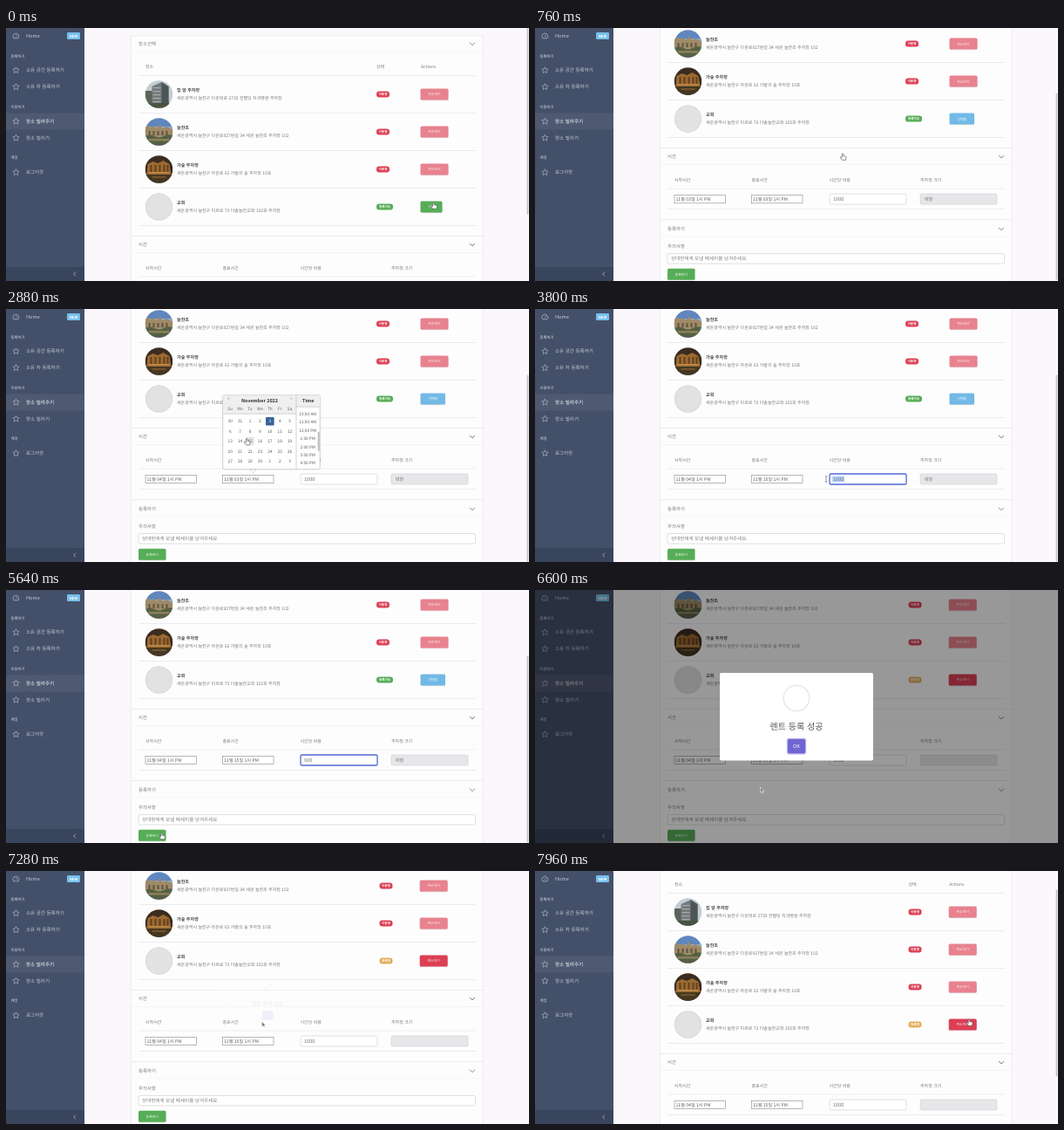
These frames come from a looping animation (600x290 px, 8 s). An HTML page:

```html
<!DOCTYPE html>
<html lang="ko">
<head>
<meta charset="utf-8">
<title>주차장 빌려주기</title>
<style>
html, body { margin: 0; width: 100%; height: 100%; overflow: hidden; background: #faf8fa; }
svg { display: block; width: 600px; height: 290px; }
text { font-family: "Noto Sans CJK KR", "Noto Sans CJK", "Noto Sans", sans-serif; text-rendering: geometricPrecision; white-space: pre; }
</style>
</head>
<body>
<svg id="stage" viewBox="0 0 600 290" xmlns="http://www.w3.org/2000/svg"></svg>
<script>
const LOOP = 8000, MAX_SCROLL = 102;
const SELECT_AT = 140, SAVED_AT = 6260, CLOSE_AT = 7160, CLOSED_AT = 7310;
const START_OPEN = 1280, START_PICK = 1860, END_OPEN = 2400, END_PICK = 3040;
const FOCUS_AT = 3400, BLUR_AT = 5720;
const INK = '#77757d', RED = '#dc3f54', PINK = '#e8828e', GREEN = '#56ad57', BLUE = '#72b9e6';

// --- markup helpers; y is the vertical middle of a text line
const text = (x, y, str, size, fill = INK, extra = '') =>
  `<text x="${x}" y="${y + size * 0.36}" font-size="${size}" fill="${fill}" ${extra}>${str}</text>`;
const mid = (x, y, str, size, fill, extra = '') =>
  text(x, y, str, size, fill, `text-anchor="middle" ${extra}`);
const bold = 'font-weight="700"', medium = 'font-weight="500"';
const rect = (x, y, w, h, fill, extra = '') =>
  `<rect x="${x}" y="${y}" width="${w}" height="${h}" fill="${fill}" ${extra}/>`;
const rule = (x1, x2, y, color = '#e2e0e5') => rect(x1, y - 0.3, x2 - x1, 0.6, color);
const stroke = (d, color, width, extra = '') =>
  `<path d="${d}" fill="none" stroke="${color}" stroke-width="${width}" ${extra}/>`;
const group = (id, body, extra = '') => `<g id="${id}" ${extra}>${body}</g>`;

const badge = (x, y, w, label, fill) =>
  rect(x, y - 3.5, w, 7, fill, 'rx="3.2"') + mid(x + w / 2, y, label, 3.6, '#fff', bold);
const button = (x, y, w, label, fill) =>
  rect(x, y - 5.8, w, 13, '#000', 'rx="1.5" opacity=".12"') +
  rect(x, y - 6.5, w, 13, fill, 'rx="1.5"') + mid(x + w / 2, y, label, 3.9, '#fff', medium);
const chevron = y => stroke(`M532 ${y - 1.3}l3 3 3-3`, '#77747c', 0.9);

// --- sidebar
function sidebar() {
  const star = y => {
    const points = Array.from({ length: 10 }, (_, i) => {
      const r = i % 2 ? 1.8 : 3.8, a = i * Math.PI / 5 - Math.PI / 2;
      return `${(11.5 + r * Math.cos(a)).toFixed(2)},${(y + r * Math.sin(a)).toFixed(2)}`;
    });
    return `<polygon points="${points.join(' ')}" fill="none" stroke="#aeb5c3" stroke-width=".7"/>`;
  };
  const item = (y, label, fill = '#c8ccd6') => star(y) + text(23, y, label, 5.55, fill);
  const title = (y, label) => text(5.5, y, label, 4.4, '#dde0e6', medium);
  return rect(0, 0, 90, 290, '#445069') +
    rect(0, 97.5, 90, 19, '#4f5a72') +
    stroke('M8.8 11.8a3.4 3.4 0 1 1 5.2 0zM11.4 10.2l1-2.2', '#aeb5c3', 0.8) +
    text(23, 9, 'Home', 5.6, '#c8ccd6') +
    rect(70, 5, 15, 8, '#76bfeb', 'rx="1.2"') + mid(77.5, 9, 'NEW', 4.2, '#fff', bold) +
    title(32, '등록하기') + item(48.5, '소유 공간 등록하기') + item(67.5, '소유 차 등록하기') +
    title(90, '이용하기') + item(107, '장소 빌려주기', '#fff') + item(126, '장소 빌리기') +
    title(148, '계정') + item(165.5, '로그아웃') +
    rect(0, 274, 90, 16, '#39455d') + stroke('M80 279.6l-2.4 2.4 2.4 2.4', '#b5bac6', 0.8);
}

// --- place pictures, drawn around the origin and clipped to a circle
const pictures = [
  rect(-16, -16, 32, 32, '#c3cdd2') + rect(-16, -4, 12, 20, '#59655a') +
    '<path d="M-8 16V-9L3-14 11-9V16z" fill="#737a7c"/><path d="M3-14L11-9V16H3z" fill="#4c5558"/>' +
    [-8, -4, 0, 4, 8].map(y => rect(-7, y, 9, 1.2, '#a5acac')).join('') + rect(-16, 10, 32, 6, '#49543f'),
  rect(-16, -16, 32, 32, '#5f86be') + rect(-16, -6, 32, 5, '#90a9c6') +
    '<path d="M-16 8V-5l3-3 3 3 4-2 4 3 3-5 3 5 5-2 7 4V8z" fill="#a08a66"/>' +
    [-12, -7, -2, 3, 8].map(x => rect(x, -1, 2, 5, '#5e5443')).join('') +
    '<path d="M-16 5q6-3 11 0t10 0 11-1V16H-16z" fill="#556044"/>' + rect(-12, 8, 24, 2.5, '#8d8058'),
  rect(-16, -16, 32, 32, '#3b2c20') + '<path d="M-14 6l1-12 6-3 6 2 6-3 7 4 2 12z" fill="#9c6a32"/>' +
    [-10, -5, 0, 5, 9].map(x => rect(x, -5, 2, 9, '#64401f')).join('') + rect(-12, 3, 24, 1.5, '#c08f4b') +
    rect(-16, 6, 32, 10, '#443722') + rect(-8, 8, 16, 2, '#745228'),
  '<circle r="16" fill="#d6d6d6"/><circle r="15" fill="#e2e2e2"/>'
];
const places = [
  ['집 앞 주차장', '새온광역시 늘찬구 다온대로 2735 한별딩 치과병원 주차장'],
  ['늘찬초', '새온광역시 늘찬구 다온로927번길 34 새온 늘찬초 주차장 102'],
  ['가숲 주차장', '새온광역시 늘찬구 라온로 62 가람의 숲 주차장 10호'],
  ['교회', '새온광역시 늘찬구 미르로 73 다솔늘찬교회 102호 주차장']
];

function page() {
  const rowY = i => 76 + i * 43;
  const rows = places.map(([name, address], i) => {
    const y = rowY(i);
    return `<g transform="translate(175.5 ${y})" clip-path="url(#round)">${pictures[i]}</g>` +
      text(196, y - 5, name, 5.1, '#47454d', bold) + text(196, y + 4, address, 5) + rule(152, 539, y + 21.3);
  }).join('');
  const busy = [0, 1, 2].map(rowY);
  const lastY = rowY(3);
  const statuses = text(425, 44.5, '상태', 5) + busy.map(y => badge(425, y, 15, '이용중', RED)).join('') +
    group('free', badge(425, lastY, 19, '등록가능', GREEN)) +
    group('listed', badge(425, lastY, 15, '등록중', '#e3ae5a'));
  const actions = text(476, 44.5, 'Actions', 5) + busy.map(y => button(475.5, y, 32, '취소하기', PINK)).join('') +
    group('choose', button(475.5, lastY, 25, '선택', GREEN)) +
    group('chosen', button(475.5, lastY, 28.5, '선택됨', BLUE)) +
    group('cancel', button(475.5, lastY, 32, '취소하기', RED));
  const dateBox = (x, id) => rect(x, 292.3, 58.5, 9.4, '#fff', 'stroke="#88868c" stroke-width=".6"') +
    group(id, text(x + 1.5, 297, '', 5.1, '#5a585f'));
  const heads = ['시작시간', '종료시간', '시간당 비용', '주차장 크기'];
  return rect(143.5, 9, 403.5, 400, '#fefdfe', 'stroke="#e4e2e7" stroke-width=".6"') +
    text(152, 18, '장소선택', 5.4) + chevron(18) + rule(144, 547, 27, '#f0eef2') +
    text(160, 44.5, '장소', 5) + rule(152, 539, 54.4) + rows +
    group('statuses', statuses) + group('actions', actions) +
    rule(144, 547, 238.3) + text(152, 248, '시간', 5.4) + chevron(248.3) + rule(144, 547, 257.5, '#f0eef2') +
    heads.map((h, i) => text([160, 248.5, 337.5, 442][i], 274.7, h, 5)).join('') + rule(152, 539, 285) +
    dateBox(160, 'startDate') + dateBox(248.5, 'endDate') +
    rect(338, 291, 88, 12, '#fff', 'id="cost" rx="1.6"') +
    rect(341, 293.5, 14, 7, '#b4d5fe', 'id="selection"') +
    group('costText', text(342, 297, '', 5.6, '#77757d')) +
    rect(442, 291, 88, 12, '#e8e6e9', 'rx="1.6" stroke="#cfcdd3" stroke-width=".6"') +
    group('size', text(446.5, 297, '대형', 5.3)) + rule(152, 539, 308.5) +
    rule(144, 547, 320.3) + text(152, 330.7, '등록하기', 5.4) + chevron(331) + rule(144, 547, 340, '#f0eef2') +
    text(152, 351.3, '주의사항', 5.4) +
    rect(152, 359.5, 386.5, 11.5, '#fff', 'rx="1.6" stroke="#cbc9cf" stroke-width=".6"') +
    text(156, 365.3, '상대방에게 보낼 메세지를 남겨주세요.', 5.55, '#807e85') +
    button(152, 383.2, 31.5, '등록하기', GREEN);
}

// --- calendar popup, drawn from its own top left corner
const CELL = 11.4;
const dayX = col => 8.5 + col * CELL, dayY = row => 30 + row * CELL;
function calendar() {
  const names = ['Su', 'Mo', 'Tu', 'We', 'Th', 'Fr', 'Sa'];
  const hours = ['10:00 AM', '11:00 AM', '12:00 PM', '1:00 PM', '2:00 PM', '3:00 PM', '4:00 PM'];
  const dayMark = (extra, fill) => rect(-4.8, -4.8, 9.6, 9.6, fill, `rx="1.3" ${extra}`);
  const marked = `transform="translate(${dayX(4)} ${dayY(0)})"`;
  const days = Array.from({ length: 35 }, (_, i) => {
    const date = i < 2 ? 30 + i : (i - 2) % 30 + 1;
    return mid(dayX(i % 7), dayY(Math.floor(i / 7)), date, 4.7, i === 4 ? '#fff' : '#55535a');
  }).join('');
  return rect(0, 0, 111.5, 85, '#fff', 'rx="1.5" stroke="#aaa8ad" stroke-width=".6"') +
    rect(0.3, 0.3, 84, 21, '#f0eff0') + rect(84.6, 0.3, 26.6, 13, '#f0eff0') +
    rule(0, 84, 21.3, '#b5b3b8') + rule(84, 111, 13.3, '#b5b3b8') + rect(84, 0, 0.6, 85, '#b5b3b8') +
    stroke('M7.3 2l-1.6 1.6 1.6 1.6M77.6 2l1.6 1.6-1.6 1.6', '#aaa', 0.8) +
    mid(42.3, 6.6, 'November 2022', 5.4, '#2f2d33', bold) + mid(98, 6.6, 'Time', 5.4, '#2f2d33', bold) +
    names.map((n, i) => mid(dayX(i), 16, n, 4.7, '#5f5d64')).join('') +
    dayMark('id="hovered"', '#e6e5e8') + dayMark(marked, '#39639a') + days +
    hours.map((h, i) => mid(97.5, 21.5 + i * 9.4, h, 4.7, '#55535a')).join('') +
    rect(109, 42, 2, 22, '#bdbbc0', 'rx="1"') +
    '<path d="M31 85l3.6 4 3.6-4z" fill="#fff" stroke="#aaa8ad" stroke-width=".5"/>';
}

const dialog = () =>
  rect(212, 95, 176, 100.5, '#fff', 'rx="1.8"') +
  '<circle cx="300" cy="124" r="14.8" fill="none" stroke="#e5e8e3" stroke-width="1.5"/>' +
  stroke('M292 125l5.5 5.5 11-12', '#a9d593', 1.8, 'id="check" pathLength="1" stroke-dasharray="1 2" stroke-linecap="round"') +
  mid(300, 156, '렌트 등록 성공', 10, '#545454') +
  rect(288.8, 169.8, 22.4, 18.6, '#b9b3ee', 'rx="2.6"') + rect(290, 171, 20, 16.2, '#7066d2', 'rx="1.8"') +
  mid(300, 179, 'OK', 5.6, '#fff', medium);

const cursors =
  group('hand', '<path transform="scale(.85)" d="M-.9.4Q0-.5.9.4V3l3 .7q1 .4.8 1.5L4 8.6H-.9L-3.3 5.3q-.1-1.2 1-.9l1.4.9z" fill="#fff" stroke="#444" stroke-width=".7" stroke-linejoin="round"/>') +
  group('arrow', '<path d="M0 0V6L1.5 4.8 2.5 7 3.4 6.6 2.4 4.5H4.3z" fill="#777" stroke="#fff" stroke-width=".5"/>') +
  group('beam', stroke('M-1.2-3.2H1.2M0-3.2V3.2M-1.2 3.2H1.2', '#555', 0.6));

document.getElementById('stage').innerHTML =
  '<defs><clipPath id="round"><circle r="15.8"/></clipPath></defs>' +
  rect(0, 0, 600, 290, '#faf8fa') + group('page', page()) + group('calendar', calendar()) + sidebar() +
  rect(597.6, 0, 1.8, 214, '#c3c1c7', 'id="thumb" rx=".9"') +
  rect(0, 0, 600, 290, '#000', 'id="shade"') + group('dialog', dialog()) + group('cursor', cursors);

// --- motion
const $ = id => document.getElementById(id);
const show = (id, on) => $(id).setAttribute('visibility', on ? 'inherit' : 'hidden');
const move = (id, x, y) => $(id).setAttribute('transform', `translate(${x} ${y})`);
const write = (id, str) => { $(id).firstChild.textContent = str; };
const progress = (t, from, to) => Math.min(1, Math.max(0, (t - from) / (to - from)));
const smooth = p => p * p * (3 - 2 * p);
const easeOut = p => 1 - (1 - p) ** 2.5;

// time, x, y, pointer shape from that time on
const track = [
  [0, 490.5, 200, 'hand'], [260, 490.5, 200, 'arrow'], [700, 353, 144, 'hand'], [900, 353, 144, 'arrow'],
  [1220, 190, 194, 'beam'], [1420, 190, 194, 'hand'], [1740, 225, 127, 'hand'], [1920, 225, 127, 'arrow'],
  [2260, 285, 194, 'beam'], [2480, 285, 194, 'hand'], [2840, 276, 148.5, 'hand'], [3080, 277, 149, 'arrow'],
  [3340, 358, 195, 'beam'], [3440, 358, 195, 'beam'], [3800, 334, 195, 'beam'], [4600, 334, 195, ''],
  [5200, 334, 195, 'arrow'], [5560, 178.5, 278.5, 'hand'], [5860, 178.5, 278.5, 'arrow'],
  [6500, 258.5, 226, 'arrow'], [6660, 258.5, 226, 'arrow'], [7000, 299, 177, 'hand'], [7140, 299, 177, 'arrow'],
  [7270, 293.5, 172.5, 'arrow'], [7420, 293.5, 172.5, 'arrow'], [7860, 498, 170, 'hand'], [LOOP, 498, 170, 'hand']
];
function pointer(t) {
  const i = track.findIndex(key => key[0] > t);
  const [t0, x0, y0, shape] = track[i - 1], [t1, x1, y1] = track[i];
  const p = smooth(progress(t, t0, t1));
  return { x: x0 + (x1 - x0) * p, y: y0 + (y1 - y0) * p, shape };
}

function dialogScale(t) {
  const p = progress(t, SAVED_AT, SAVED_AT + 300);
  if (t >= CLOSE_AT) return 1 - 0.5 * progress(t, CLOSE_AT, CLOSED_AT);
  if (p < 0.45) return 0.7 + 0.35 * p / 0.45;
  if (p < 0.8) return 1.05 - 0.1 * (p - 0.45) / 0.35;
  return 0.95 + 0.05 * (p - 0.8) / 0.2;
}

function costValue(t) {
  if (t < 4600 || t >= SAVED_AT) return '1000';
  return '600'.slice(0, 1 + Math.min(2, Math.floor((t - 4600) / 80)));
}

function drawCalendar(t, cursor) {
  const first = t >= START_OPEN && t < START_PICK;
  const open = first || (t >= END_OPEN && t < END_PICK);
  const left = first ? 160 : 248.7, top = 98.8;
  show('calendar', open);
  move('calendar', left, top);
  const col = Math.round((cursor.x - left - dayX(0)) / CELL);
  const row = Math.round((cursor.y + 1 - top - dayY(0)) / CELL);
  show('hovered', open && col >= 0 && col < 7 && row >= 0 && row < 5);
  move('hovered', dayX(col), dayY(row));
}

function drawDialog(t) {
  const visible = t >= SAVED_AT && t < CLOSED_AT;
  show('thumb', !visible);
  show('dialog', visible);
  $('dialog').setAttribute('opacity', (1 - progress(t, CLOSE_AT, CLOSED_AT)) ** 1.4);
  $('dialog').setAttribute('transform', `translate(300 145.2) scale(${dialogScale(t)}) translate(-300 -145.2)`);
  $('shade').setAttribute('opacity',
    0.4 * (progress(t, SAVED_AT, SAVED_AT + 100) - progress(t, CLOSE_AT, CLOSE_AT + 100)));
  const drawn = smooth(progress(t, SAVED_AT + 405, SAVED_AT + 750));
  show('check', visible && drawn > 0);
  $('check').setAttribute('stroke-dashoffset', 1 - drawn);
}

function draw(t) {
  const saved = t >= SAVED_AT, selected = t >= SELECT_AT;
  const scroll = MAX_SCROLL * easeOut(progress(t, 360, 840)) - 73 * smooth(progress(t, 7480, 7940));
  move('page', 0, -scroll);
  $('thumb').setAttribute('y', scroll * 0.74);

  show('free', !saved);
  show('listed', saved);
  show('choose', !selected);
  show('chosen', selected && !saved);
  show('cancel', saved);
  show('size', !saved);
  move('statuses', saved ? 3.5 : 0, 0);
  move('actions', saved ? -0.8 : 0, 0);

  write('startDate', `11월 ${t < START_PICK ? '03' : '04'}일 1시 PM`);
  write('endDate', `11월 ${t < END_PICK ? '03' : '15'}일 1시 PM`);
  write('costText', costValue(t));
  const focused = t >= FOCUS_AT && t < BLUR_AT;
  $('cost').setAttribute('stroke', focused ? '#5268d8' : '#cbc9cf');
  $('cost').setAttribute('stroke-width', focused ? 1.3 : 0.6);
  const dragged = 14 * progress(t, 3440, 3760);
  show('selection', t < 4600);
  $('selection').setAttribute('width', dragged);
  $('selection').setAttribute('x', 355 - dragged);

  const cursor = pointer(t);
  drawCalendar(t, cursor);
  drawDialog(t);
  move('cursor', cursor.x, cursor.y);
  ['hand', 'arrow', 'beam'].forEach(shape => show(shape, shape === cursor.shape));
}

const began = performance.now();
function frame() {
  draw((performance.now() - began) % LOOP);
  requestAnimationFrame(frame);
}
frame();
</script>
</body>
</html>
```
